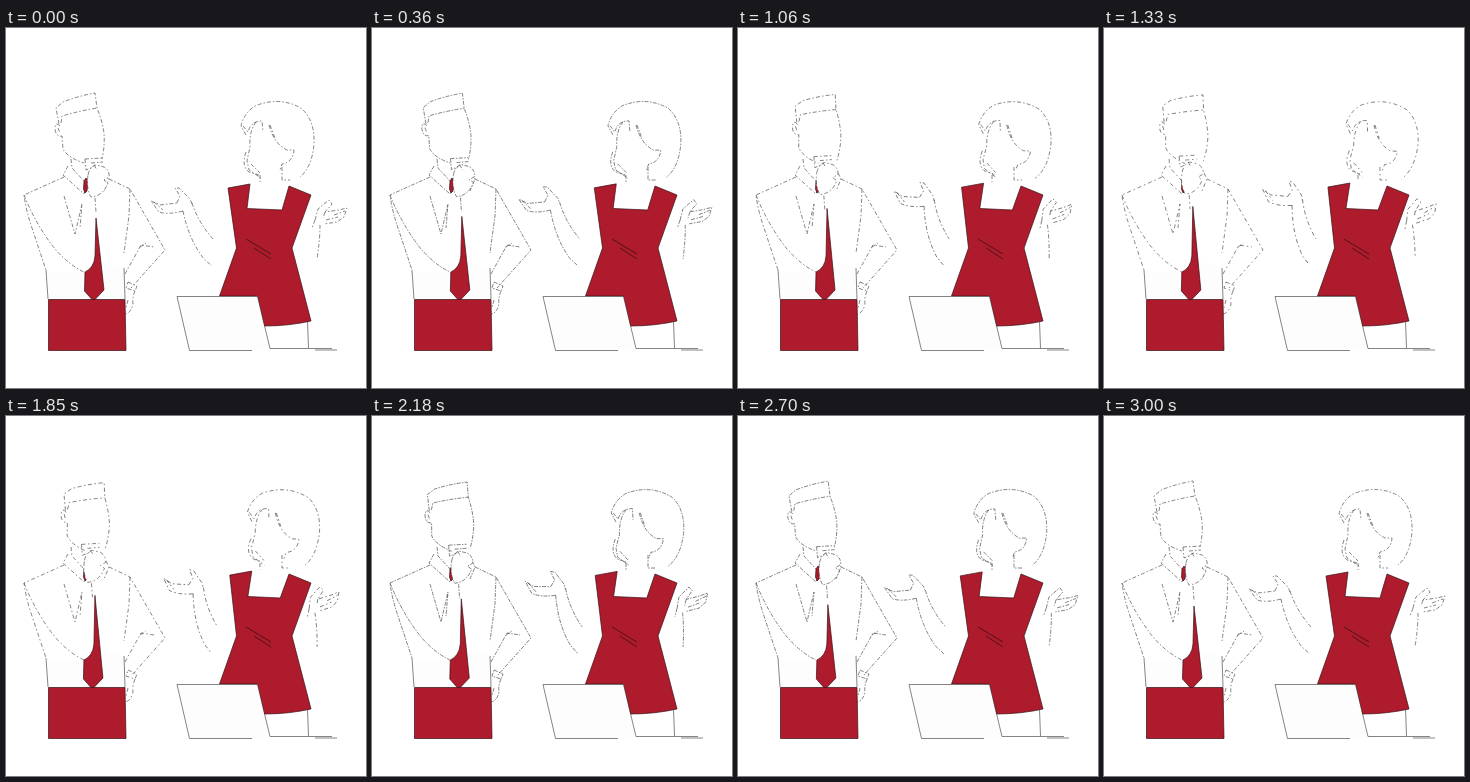
These frames come from a looping animation (360x360 px, 3030 ms). An HTML page:

```html
<!DOCTYPE html>
<html lang="en">
<head>
<meta charset="utf-8">
<title>Conversation</title>
<style>
  html, body { margin: 0; width: 100%; height: 100%; overflow: hidden; background: #fff; }
  svg { display: block; width: 100vw; height: 100vh; }
  path { fill: none; stroke: #333; stroke-width: .6; stroke-linejoin: round; }
  .red { fill: #ad1b2c; stroke: #3a1015; stroke-width: .7; }
  .white { fill: #fff; }
  .pale { fill: #fdfdfd; stroke: none; }
  .fold { stroke: #3a1015; stroke-width: .8; }
</style>
</head>
<body>
<svg viewBox="0 0 360 360">
  <!-- Man: shirt, arms and trousers -->
  <path class="pale" d="M42 245L78 244 90 232 119 240V271H42Z"/>
  <g class="sketch">
    <path d="M58 149L18 167Q20 183 27 203L40 242"/>
    <path d="M18 167Q30 197 49 221Q63 237 78 244"/>
    <path d="M58 168L69 206 76 176 74 200"/>
    <path d="M103 151L124 161 159 222 125 260M124 161L123 188 118 225"/>
    <path d="M119 246L135 217 148 219M134 219L140 215"/>
    <path d="M122 254L131 258 129 263 120 260ZM129 263Q126 270 127 276Q125 285 119 286M122 272L120 280"/>
    <path d="M62 138L57 147 78 166 81 157M100 145L103 151 98 163"/>
    <path d="M65 131L66 140 78 153"/>
  </g>
  <path d="M40 242L42 271M118 240L119 271"/>
  <path class="red" d="M42.500 271.500H119L120 322.500H42.500Z"/>
  <path class="red" d="M80 150L82 153 81 163 79 165 77.500 161 78 153Z"/>
  <path class="red" id="tie" d=""/>
  <g class="sketch" id="chin">
    <path class="white" d="M82 147Q84 138 90 137L98 139Q104 143 103 149L98 152 102 155Q97 168 85 169Q80 160 82 147Z"/>
    <path d="M79 131L97 130M85 135L97 134M79 131L80 142 87 139"/>
    <path d="M88 137L91 142M89 170L90 184"/>
  </g>
  <g class="sketch" id="manHead">
    <path d="M53 96L50 80 57 74Q72 68 89 65L91 80Q96 92 98 105Q99 118 96 131"/>
    <path d="M55 95L56 88Q73 83 91 80"/>
    <path d="M54 98Q49 93 49 101Q50 109 56 108L57 121Q62 130 78 135"/>
    <path d="M52 100L54 105"/>
  </g>

  <!-- Woman: head, arms and dress -->
  <g class="sketch" id="womanHead">
    <path d="M240 107L235 98Q238 85 249 78Q273 68 295 80Q309 92 308 116Q306 139 294 149"/>
    <path d="M237 98L242 104Q245 93 256 93L257 104M264 97L269 110M263 97Q268 116 281 122L288 122Q287 134 276 136L274 142"/>
    <path d="M250 94Q243 103 244 119L241 133 243 142 255 150"/>
    <path d="M240 124Q235 138 243 144L253 147M245 136L254 145"/>
  </g>
  <g class="sketch">
    <path d="M254 147V154M276 139V152H284"/>
  </g>
  <path class="red" id="dress" d=""/>
  <path class="fold" d="M240 211L265 226M248 220L265 231"/>
  <g class="sketch" id="leftArm">
    <path d="M177 183Q162 187 153 184L145 173 154 177 171 175M148 174L157 182M171 175L174 168 169 160 173 160 184 171 186 176"/>
    <path d="M177 183Q183 212 198 231L206 238M186 175Q192 194 207 211"/>
  </g>
  <g class="sketch" id="rightArm">
    <path d="M309 192L312 181 323 172 326 176 319 184 333 182 341 180 338 189 331 194 318 196M319 184L317 190M328 187L339 183M320 192L332 189"/>
    <path d="M314 197Q314 212 311 231M309 192L306 200"/>
  </g>

  <!-- Laptop and table -->
  <path d="M301.500 293L302.500 320"/>
  <path class="pale" d="M171 268.500H251.500L264 322.500H183.500Z"/>
  <path d="M246 322.500H183.500L171 268.500H251.500L264 320.500H303M303 320.500H326M309 322H331"/>
</svg>
<script>
  const PERIOD = 3030;
  const set = (id, name, value) => document.getElementById(id).setAttribute(name, value);
  const turn = (id, angle, x, y) => set(id, 'transform', `rotate(${angle} ${x} ${y})`);
  const sketches = document.querySelectorAll('.sketch');

  function draw(now) {
    // Sway: 0 at the loop's ends, 1 halfway through.
    const p = (1 - Math.cos(now / PERIOD * 2 * Math.PI)) / 2;

    turn('manHead', 6 * p, 75, 165);
    turn('womanHead', 3.5 * p, 268, 215);
    turn('leftArm', 12 * p, 210, 235);
    turn('rightArm', -10 * p, 310, 230);
    set('chin', 'transform', `translate(${-4 * p} ${-3 * p})`);
    set('tie', 'transform', `translate(${-1.2 * p} 0)`);
    set('tie', 'd', `M90 ${190 - 12 * p}L98 262 89 271.500H86L78.500 263 79 244Q88 240 89 228Z`);
    set('dress', 'd', `M${222 + 2 * p} ${160 - p}L${244 + 2 * p} ${156 - p} ${241 + p} 180.500
      L${276 - 2 * p} 182 283 158 305 167 286 220 305 293Q283 298 258 298L251 268H213.500L230.500 220Z`);

    // Broken pencil lines close up near the middle of the sway.
    const gap = .3 + 4.5 * Math.abs(p - .38);
    sketches.forEach(s => s.setAttribute('stroke-dasharray', `4 ${gap} 1.5 ${gap}`));
    requestAnimationFrame(() => draw(performance.now()));
  }
  draw(performance.now());
</script>
</body>
</html>
```
